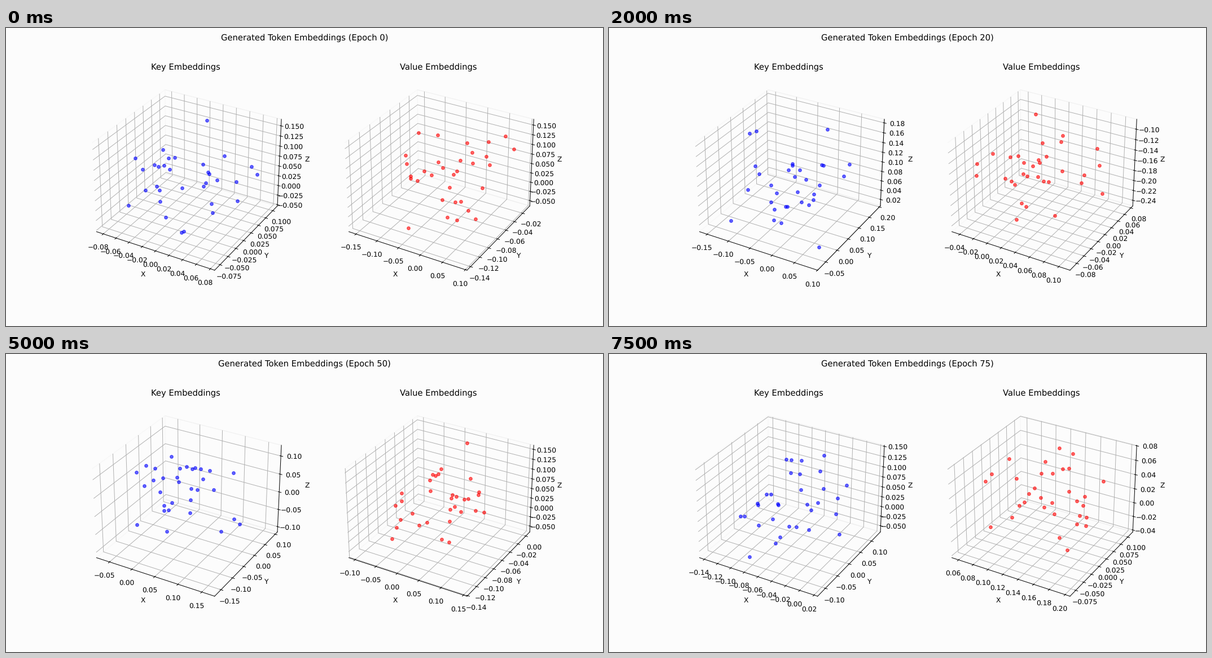
These frames come from a looping animation (1058x529 px, 8 s). A matplotlib script:

```python
import numpy as np
import matplotlib.pyplot as plt
from matplotlib.animation import FuncAnimation

WIDTH, HEIGHT = 1058, 529
DPI = WIDTH / 12
STEP = 5            # epochs between two pictures
FRAMES = 16
INTERVAL = 500
TOKENS = 32
SHIFT = 0.06        # spread of the cloud centres
BACK = "#fcfcfc"

plt.rcParams["text.hinting"] = "no_hinting"


def embed(rng):
    """A fresh cloud of tokens with its own centre and size on each axis."""
    centre = rng.normal(0, SHIFT, 3)
    sigma = rng.uniform(0.037, 0.06, 3)
    return rng.normal(centre, sigma, (TOKENS, 3)).T


def draw_panel(ax, title, color, points):
    ax.clear()
    ax.set_facecolor(BACK)
    ax.scatter(*points, c=color, alpha=0.6, depthshade=False)
    ax.set(title=title, xlabel="X", ylabel="Y", zlabel="Z")
    for axis in (ax.xaxis, ax.yaxis, ax.zaxis):
        axis.pane.fill = False


def update(i):
    epoch = i * STEP
    rng = np.random.default_rng(epoch)
    heading.set_text(f"Generated Token Embeddings (Epoch {epoch})")
    draw_panel(key_ax, "Key Embeddings", "blue", embed(rng))
    draw_panel(value_ax, "Value Embeddings", "red", embed(rng))
    return []


fig = plt.figure(figsize=(WIDTH / DPI, HEIGHT / DPI), dpi=DPI, facecolor=BACK)
key_ax = fig.add_subplot(121, projection="3d")
value_ax = fig.add_subplot(122, projection="3d")
heading = fig.suptitle("")

anim = FuncAnimation(fig, update, frames=FRAMES, interval=INTERVAL,
                     init_func=lambda: update(0), repeat=True,
                     repeat_delay=0, blit=False)
plt.show()
```
